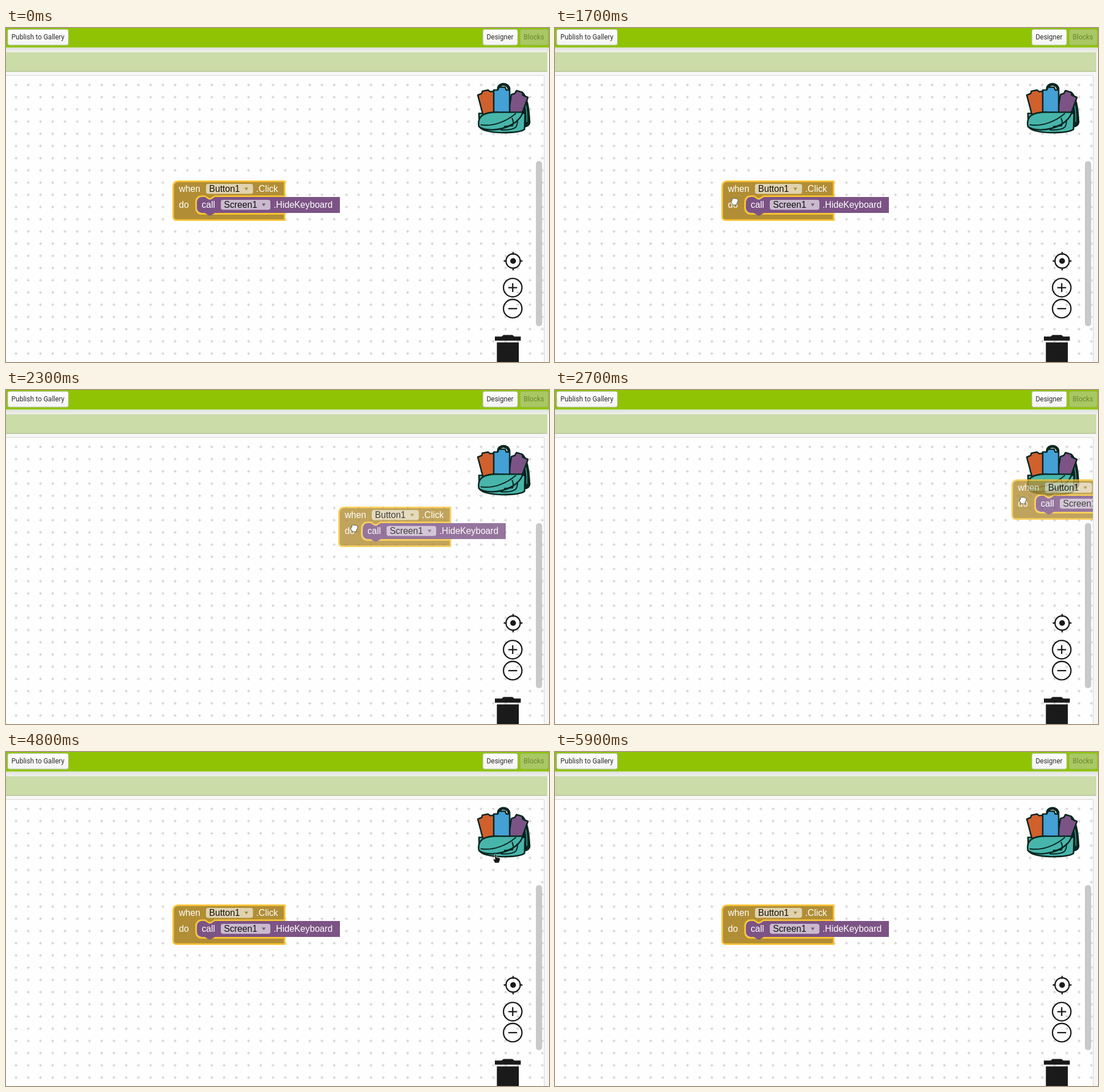
An HTML page that plays this animation: 953 by 587 pixels, repeating every 6.9 s.

```html
<!DOCTYPE html>
<html lang="en">
<head>
<meta charset="utf-8">
<title>Block copied to the backpack</title>
<style>
  html, body { margin: 0; width: 100%; height: 100%; overflow: hidden; background: #fff; }
  svg { display: block; }
  .ui { font: 12px Roboto, sans-serif; text-anchor: middle; fill: #2b2b2b; }
  .label { font: 15.7px "Liberation Sans", Arial, sans-serif; fill: #fff; }
  .field { fill: #111; }
  .icon { fill: none; stroke: #1a1a1a; stroke-width: 2.3; }
  .bag { stroke: #08251f; stroke-width: 2.6; stroke-linejoin: round; }
</style>
</head>
<body>
<svg width="953" height="587" viewBox="0 0 953 587">
  <defs>
    <pattern id="grid" x="6.9" y="89.3" width="21.48" height="21.46" patternUnits="userSpaceOnUse">
      <path d="M7.7 10.7h6M10.7 7.7v6" stroke="#cbcbcb" stroke-width="1"/>
      <circle cx="10.7" cy="10.7" r=".8" fill="#b4b4b4"/>
    </pattern>
    <linearGradient id="button" x2="0" y2="1">
      <stop stop-color="#fff"/><stop offset="1" stop-color="#f3f3f3"/>
    </linearGradient>
    <linearGradient id="shade" x2="0" y2="1">
      <stop stop-color="#dfe2dc"/><stop offset="1" stop-color="#f1f2ef"/>
    </linearGradient>
    <clipPath id="work"><path d="M0 84H944V587H0z"/></clipPath>
  </defs>

  <!-- page -->
  <rect width="953" height="587" fill="#f6f6f6"/>
  <rect width="953" height="34.5" fill="#8fc303"/>
  <rect y="34.5" width="953" height="8" fill="url(#shade)"/>
  <rect y="42.5" width="950" height="34" fill="#cbdca9"/>
  <path d="M0 76.3H950" stroke="#a3b383"/>
  <rect y="83" width="944" height="504" fill="#fefefe"/>
  <rect y="90" width="944" height="497" fill="url(#grid)"/>
  <path d="M0 83.5H944.5V587" fill="none" stroke="#d6d8d2"/>

  <!-- toolbar -->
  <g stroke="#b9bdb0">
    <rect x="3" y="2.5" width="106.5" height="27.5" rx="3" fill="url(#button)"/>
    <rect x="837" y="2.5" width="61" height="27.5" rx="3" fill="url(#button)"/>
    <rect x="902.5" y="2.5" width="49" height="27.5" rx="3" fill="#a9c763" stroke="#9ab85a"/>
  </g>
  <g class="ui">
    <text x="56" y="20">Publish to Gallery</text>
    <text x="867" y="20">Designer</text>
    <text x="926.5" y="20" fill="#6b8630">Blocks</text>
  </g>

  <!-- backpack -->
  <g class="bag">
    <path d="M864 108C864 96 882 96 883 108" fill="none" stroke-width="5"/>
    <path d="M907 114C915 122 918 140 919 166Q919 172 909 174Z" fill="#08251f"/>
    <path d="M911 132Q915 146 914 165" fill="none" stroke="#48b5ab" stroke-width="1.3"/>
    <path d="M830 150H911L910 178Q903 184 870 184Q838 183 831 174Z" fill="#48b5ab"/>
    <path d="M828 118L835 115L836 111L846 109L850 112L856 111L858 148L837 152Z" fill="#d0602c"/>
    <path d="M887 117L893 115L896 110L906 113L907 118L916 122L905 152L882 148Z" fill="#7c5385"/>
    <path d="M856 109H863L865 104H876L878 109H884V149H856Z" fill="#45a0d5"/>
    <path d="M830 173C826 153 842 147 866 148H907C902 165 880 178 853 179Q836 179 830 173Z" fill="#48b5ab"/>
    <path d="M833 170C856 174 880 163 895 150" fill="none" stroke-width="2"/>
    <path d="M874 173L889 172Q892 166 888 158M868 179Q889 180 895 174Q899 166 897 161" fill="none" stroke-width="2"/>
  </g>

  <!-- workspace controls -->
  <rect x="930" y="234" width="11" height="290" rx="5" fill="#c9c9c9"/>
  <g class="icon">
    <circle cx="890" cy="409.5" r="12.5"/>
    <path d="M890 393.5v5M890 421v5M873.5 409.5h5M901.5 409.5h5"/>
    <circle cx="890" cy="409.5" r="3.9" fill="#1a1a1a"/>
    <circle cx="889.3" cy="456.3" r="16.2"/>
    <path d="M881.5 456.3h15.6M889.3 448.5v15.6"/>
    <circle cx="889.3" cy="493.2" r="16.2"/>
    <path d="M881.5 493.2h15.6"/>
  </g>
  <path d="M858 542.3H870L873 539.5H889L892 542.3H903.5V549.5H858ZM861.5 552.5H900V587H861.5Z" fill="#1a1a1a"/>

  <!-- event block -->
  <g clip-path="url(#work)">
    <g id="block">
      <path d="M302 269.3H489V295.7H366.5l-7 4.5h-3.5l-7-4.5H343a9.5 9.5 0 0 0-9.5 9.5V317a9.5 9.5 0 0 0 9.5 9.5H489V337.7H299a5.5 5.5 0 0 1-5.5-5.5V277.8a8.5 8.5 0 0 1 8.5-8.5Z"
        fill="#b18e35" stroke="#f9c433" stroke-width="2.8"/>
      <path d="M335 305.5a8.5 8.5 0 0 1 8.5-8.5H349l7 4.5h3.5l7-4.5H586V325H366.5l-7 4.5h-3.5l-7-4.5H343.5a8.5 8.5 0 0 1-8.5-8.5Z" fill="#7c5385"/>
      <g fill="#fff" fill-opacity=".6">
        <rect x="351" y="274" width="82.5" height="17.5" rx="4"/>
        <rect x="377" y="302" width="87" height="17.5" rx="4"/>
      </g>
      <g class="label">
        <text x="303.5" y="288">when</text>
        <text x="356.5" y="288" class="field">Button1</text>
        <text x="439" y="288">.Click</text>
        <text x="303.5" y="315.5">do</text>
        <text x="343.5" y="316">call</text>
        <text x="382.5" y="316" class="field">Screen1</text>
        <text x="469.5" y="316">.HideKeyboard</text>
      </g>
      <path d="M418.5 280.5h6.6l-3.3 5z" fill="#a98835"/>
      <path d="M449 308.5h6.6l-3.3 5z" fill="#7c5385"/>
    </g>
  </g>

  <!-- pointer, centred on 0,0 -->
  <g id="cursor" stroke-linejoin="round">
    <path id="open" d="M-3 8L-7 1Q-7-1-4 1L-5-5Q-3-7-2-4L-1-7Q1-8 2-4L4-6Q6-6 5-2Q8-4 7 0L4 8Z" fill="#fff" stroke="#222"/>
    <path id="fist" d="M-3 7L-6 1Q-6-1-4-1L-4-4Q-2-6-1-4Q1-6 2-4Q4-5 5-3Q7-3 6 1L4 4V7Z" fill="#fff" stroke="#333" stroke-width=".8"/>
    <path id="point" d="M-3 8L-6 2Q-5 0-3 2V-7Q-1-9 0-7V-2L5-1Q7 0 6 3L4 8Z" fill="#151515" stroke="#f4f4f4" stroke-width=".8"/>
  </g>
</svg>
<script>
const LOOP = 6900, STEP = 100;
const $ = id => document.getElementById(id);

// rows: time, x, y
const cursorKeys = [
  [300, 990, 560], [1100, 315, 304], [1700, 315, 304], [2300, 611, 242],
  [2700, 821, 193], [3000, 865, 177], [3500, 865, 176], [4700, 865, 176],
  [4800, 861, 187], [5900, 965, 560]
];
const blockKeys = [[1700, 0, 0], [2300, 291, -63], [2700, 509, -111], [3000, 553, -125]];

// Monotone cubic through the keys
function sample(keys, t, axis) {
  const last = keys.length - 1;
  if (t <= keys[0][0]) return keys[0][axis];
  if (t >= keys[last][0]) return keys[last][axis];
  const i = keys.findIndex(k => k[0] > t) - 1;
  const rate = n => (keys[n + 1][axis] - keys[n][axis]) / (keys[n + 1][0] - keys[n][0]);
  const slope = n => {
    if (n === 0 || n === last) return 0;
    const a = rate(n - 1), b = rate(n);
    return a * b > 0 ? 2 * a * b / (a + b) : 0;
  };
  const span = keys[i + 1][0] - keys[i][0], u = (t - keys[i][0]) / span;
  const p = keys[i][axis], q = keys[i + 1][axis];
  return p + (q - p) * u * u * (3 - 2 * u)
    + span * u * (1 - u) * (slope(i) * (1 - u) - slope(i + 1) * u);
}

const move = (el, keys, t) =>
  el.setAttribute('transform', `translate(${sample(keys, t, 1)} ${sample(keys, t, 2)})`);

function cursorShape(t) {
  if (t < 400 || t >= 5900) return '';
  if (t >= 1700 && t < 4800) return 'fist';
  return t >= 4800 && t < 5100 ? 'point' : 'open';
}

function draw(t) {
  t = Math.floor(t / STEP) * STEP;
  const dragging = t > 1700 && t < 3500;
  move($('block'), blockKeys, dragging ? t : 0);
  $('block').setAttribute('opacity', dragging ? 0.8 : 1);
  move($('cursor'), cursorKeys, t);
  for (const id of ['open', 'fist', 'point'])
    $(id).style.display = id === cursorShape(t) ? '' : 'none';
}

const start = performance.now();
function tick() {
  draw((performance.now() - start) % LOOP);
  requestAnimationFrame(tick);
}
tick();
</script>
</body>
</html>
```
